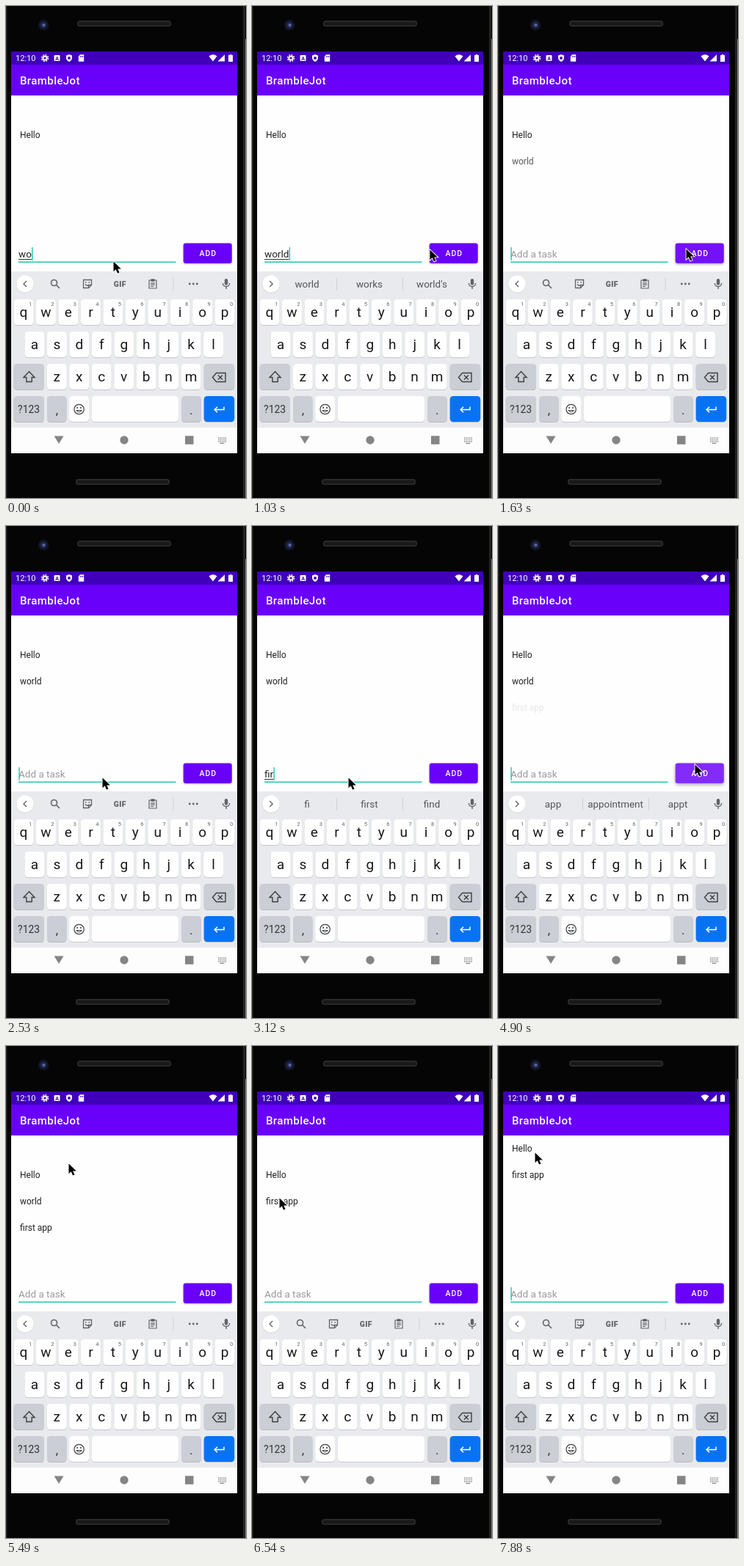
Write an HTML page with a canvas that moves like this. It is 327 px wide and 671 px high and loops after 8 s.

```html
<!DOCTYPE html>
<html lang="en">
<head>
<meta charset="utf-8">
<title>Task list</title>
<style>
html, body { margin: 0; width: 100%; height: 100%; overflow: hidden; background: #000; }
canvas { display: block; width: 327px; height: 671px; }
</style>
</head>
<body>
<canvas id="stage"></canvas>
<script>
const W = 327, H = 671, LOOP = 8000;
const canvas = document.getElementById('stage');
const dpr = window.devicePixelRatio || 1;
canvas.width = W * dpr;
canvas.height = H * dpr;
const c = canvas.getContext('2d');

const PURPLE = '#6800fa', GREY = '#5f6368', KEY = '#fefefe', DARK_KEY = '#cbced4';
const hello = ['Hello', 180, 1], world = ['world', 216, 1];
const app = (y, alpha = 1) => ['first app', y, alpha];

// Each step overrides part of the state and holds until the next one.
// typed: entry, word: start of the underlined word, words: suggestions (null = tool strip)
const steps = [
  [0, { typed: 'wo', word: 0, words: null, caret: 1, press: 0, mouse: [146, 348], rows: [hello] }],
  [140, { typed: 'wor' }],
  [290, { words: ['wo', 'would', 'work'] }],
  [440, { typed: 'worl', words: ['wor', 'work', 'world'] }],
  [590, { typed: 'world', words: ['world', 'works', "world's"] }],
  [740, { mouse: [165, 346] }],
  [880, { mouse: [212, 338] }],
  [1030, { mouse: [242, 332] }],
  [1180, { mouse: [256, 331], caret: 0 }],
  [1330, { press: 0.5 }],
  [1480, { typed: '', caret: 1, press: 1, rows: [hello, ['world', 216, 0.1]] }],
  [1630, { words: null, press: 0.4, rows: [hello, ['world', 216, 0.75]] }],
  [1780, { press: 0, mouse: [225, 337], rows: [hello, world] }],
  [1930, { mouse: [160, 342] }],
  [2080, { mouse: [131, 343], caret: 0 }],
  [2530, { caret: 1 }],
  [2830, { typed: 'f' }],
  [2980, { typed: 'fi', words: ['f', 'for', 'from'] }],
  [3120, { typed: 'fir', words: ['fi', 'first', 'find'] }],
  [3270, { typed: 'firs', words: ['fir', 'first', 'fire'] }],
  [3420, { typed: 'first', words: ['firs', 'first', 'firstly'] }],
  [3570, { typed: 'first ', word: 6, words: ['first', 'firsts', 'firstly'] }],
  [3710, { typed: 'first a', words: ['time', 'of', 'day'] }],
  [3860, { typed: 'first ap', words: ['a', 'and', 'aid'] }],
  [4010, { typed: 'first app', words: ['ap', 'app', 'apt'] }],
  [4300, { words: ['app', 'appointment', 'appt'], mouse: [150, 342] }],
  [4450, { mouse: [205, 335] }],
  [4600, { mouse: [256, 328], caret: 0 }],
  [4750, { mouse: [268, 325], press: 0.5 }],
  [4900, { typed: '', word: 0, caret: 1, press: 1, rows: [hello, world, app(252, 0.1)] }],
  [5040, { words: null, press: 0.4, rows: [hello, world, app(252, 0.75)] }],
  [5190, { press: 0, mouse: [205, 121], rows: [hello, world, app(252)] }],
  [5340, { mouse: [115, 141] }],
  [5490, { mouse: [85, 160], caret: 0 }],
  [5640, { mouse: [60, 180] }],
  [5790, { mouse: [45, 196] }],
  [5940, { mouse: [38, 205], caret: 1 }],
  [6090, { mouse: [37, 207] }],
  [6390, { caret: 0, rows: [hello, app(236)] }],
  [6540, { rows: [hello, app(216)] }],
  [6840, { mouse: [47, 165] }],
  [6990, { mouse: [50, 145], caret: 1 }],
  [7430, { caret: 0, rows: [['Hello', 164, 1], app(200)] }],
  [7580, { rows: [['Hello', 144, 1], app(180)] }],
  [7880, { caret: 1 }]
];

function rect(x, y, w, h, fill, r = 0) {
  c.fillStyle = fill;
  c.beginPath();
  c.roundRect(x, y, w, h, r);
  c.fill();
}

function disc(x, y, r, fill) {
  c.fillStyle = fill;
  c.beginPath();
  c.arc(x, y, r, 0, 7);
  c.fill();
}

function text(str, x, y, size, fill, { align = 'left', weight = 400, gap = 0 } = {}) {
  c.font = `${weight} ${size}px Roboto, sans-serif`;
  c.letterSpacing = gap + 'px';
  c.textAlign = align;
  c.fillStyle = fill;
  c.fillText(str, x, y);
}

// Path drawn around (x, y); a line width makes it an outline.
function icon(x, y, d, color, line = 0) {
  c.save();
  c.translate(x, y);
  const path = new Path2D(d);
  if (line) {
    c.strokeStyle = color;
    c.lineWidth = line;
    c.stroke(path);
  } else {
    c.fillStyle = color;
    c.fill(path, 'evenodd');
  }
  c.restore();
}

function key(x, y, w, fill = KEY) {
  rect(x, y + 1, w, 35, fill === KEY ? '#c5c8cc' : '#b6bac0', 4.5);
  rect(x, y, w, 35, fill, 4.5);
}

function phone() {
  rect(0, 0, W, H, '#050505');
  rect(0, 0, 1.5, H, '#242424');
  rect(323, 0, 3, H, '#242424');
  rect(326, 45, 1, H - 45, '#777');
  disc(51, 26, 7.5, '#11131f');
  disc(51, 26, 4.5, '#20264a');
  disc(51.5, 26, 2, '#5868b0');
  for (const [x, y] of [[97, 20], [95, 645]]) {
    rect(x, y, 128, 8, '#303030', 4);
    rect(x + 1.5, y + 1.5, 125, 5, '#191919', 2.5);
  }
}

function header() {
  rect(7, 62, 308, 548, '#fefefe');
  rect(7, 80, 308, 42, PURPLE);
  rect(7, 62, 308, 18, '#4000b9');
  text('12:10', 13, 75, 11, '#fff');
  c.setLineDash([1.9, 1.63]);
  icon(53, 71, 'M4.5 0A4.5 4.5 0 1 1 -4.5 0A4.5 4.5 0 1 1 4.5 0', '#fff', 1.5);
  c.setLineDash([]);
  icon(53, 71, 'M2.6 0A2.6 2.6 0 1 1 -2.6 0A2.6 2.6 0 1 1 2.6 0', '#fff', 2);
  rect(65.5, 67, 8, 8, '#fff', 1);
  text('A', 69.5, 73.7, 7, '#4000b9', { align: 'center', weight: 700 });
  icon(86, 71, 'M0 -5L4 -3.4V0Q3.5 3.7 0 5Q-3.5 3.7 -4 0V-3.4ZM-1.7 -1.7V1.7H1.7V-1.7Z', '#fff');
  icon(102.5, 71, 'M-1.4 -4.7H3.7V4.7H-3.7V-2.3ZM-1.3 -3V-1H-.4V-3ZM.4 -3V-1H1.2V-3ZM2 -3V-1H2.8V-3Z', '#fff');
  icon(282, 71, 'M-5.5 -2.6Q0 -6.8 5.5 -2.6L0 4.5Z', '#fff');
  icon(293, 71, 'M5 -4.7V4.5H-4.5Z', '#fff');
  icon(306, 71, 'M-1.2 -5H1.2V-4H3V5H-3V-4H-1.2Z', '#fff');
  text('BrambleJot', 19, 107, 15, '#fff', { weight: 500, gap: 0.4 });
}

function keyboard() {
  rect(7, 362, 308, 213, '#e8eaed');
  const letters = { align: 'center' };
  [['qwertyuiop', 24, 400], ['asdfghjkl', 39, 444], ['zxcvbnm', 69.3, 488]].forEach(([row, x0, y], r) => {
    [...row].forEach((ch, i) => {
      const x = x0 + i * 30.45;
      key(x - 13.4, y, 26.8);
      text(ch, x, y + 24.3, 19, '#17181a', letters);
      if (!r) text((i + 1) % 10, x + 9, 409, 7.5, GREY, letters);
    });
  });
  key(10.5, 488, 41.5, DARK_KEY);
  key(269.7, 488, 41.5, DARK_KEY);
  icon(31.5, 506, 'M0 -7.5L7.5 .5H3.7V6.5H-3.7V.5H-7.5Z', '#3c4043', 1.4);
  icon(290.5, 506.5, 'M-9 0L-4 -6H8.5V6H-4ZM-1.5 -3L4.5 3M4.5 -3L-1.5 3', '#3c4043', 1.4);
  key(10.5, 532, 41.5, DARK_KEY);
  key(56, 532, 26.5, DARK_KEY);
  key(86.2, 532, 26.8);
  key(116.8, 532, 118.2);
  key(239, 532, 26.8, DARK_KEY);
  key(269.7, 532, 41.5, '#0873f2');
  text('?123', 31, 555, 13.8, '#303236', letters);
  text(',', 69.3, 557, 17, '#303236', letters);
  text('.', 252.3, 557, 17, '#303236', letters);
  icon(99.6, 550, 'M6.7 0A6.7 6.7 0 1 1 -6.7 0A6.7 6.7 0 1 1 6.7 0M-3.5 1.5Q0 6 3.5 1.5Z', '#3c4043', 1.2);
  disc(97.2, 548, 1.1, '#3c4043');
  disc(102, 548, 1.1, '#3c4043');
  icon(290.5, 550.5, 'M6.5 -4V0H-6M-2.5 -3.8L-6.3 0L-2.5 3.8', '#fff', 1.5);
}

function navigation() {
  rect(7, 575, 308, 35, '#fdfdfd');
  icon(72, 591.5, 'M-6.5 -5H6.5L0 5.5Z', '#858585');
  disc(161, 592, 5.7, '#858585');
  rect(244, 586.3, 11.5, 11.5, '#858585');
  for (let y = 0; y < 3; y++)
    for (let x = 0; x < 5; x++) rect(289 + x * 2.4, 588.5 + y * 2.4, 1.4, 1.4, '#858585');
  rect(291.4, 595.8, 6, 1.2, '#858585');
}

function strip(words) {
  disc(26, 379.7, 11.7, '#d3d5d8');
  disc(26, 379, 11.5, '#fff');
  icon(26, 379, words ? 'M-2 -4L2 0L-2 4' : 'M2 -4L-2 0L2 4', GREY, 1.4);
  icon(300, 379, 'M-2.2 -4.7A2.2 2.2 0 0 1 2.2 -4.7V-.5A2.2 2.2 0 0 1 -2.2 -.5Z', GREY);
  icon(300, 379, 'M-4.6 -1A4.6 4.6 0 0 0 4.6 -1M0 3.6V7', GREY, 1.4);
  if (words) {
    words.forEach((w, i) => text(w, 75 + i * 85, 384, 13.4, '#505459', { align: 'center' }));
    rect(115, 371, 1, 17, '#cdd0d4');
    rect(205, 371, 1, 17, '#cdd0d4');
    return;
  }
  icon(67, 379, 'M2.5 -1.5A4 4 0 1 1 -5.5 -1.5A4 4 0 1 1 2.5 -1.5M1.3 1.3L6 6', GREY, 1.6);
  icon(111, 379, 'M-5.5 -5.5H5.5V1.5L1.5 5.5H-5.5ZM5.5 1.5H1.5V5.5M-3 .3Q-1 3.5 2 1', GREY, 1.3);
  disc(108.8, 376.8, 0.9, GREY);
  disc(113.2, 376.8, 0.9, GREY);
  text('GIF', 155.3, 382.8, 10.3, GREY, { align: 'center', weight: 900, gap: 0.4 });
  icon(200, 379, 'M-5 -5H5V6H-5ZM-2.8 -1.2H2.8M-2.8 1.2H2.8M-2.8 3.5H1', GREY, 1.2);
  rect(197.3, 372.3, 5.4, 3.4, GREY, 1);
  rect(227.5, 371, 1, 17, '#cdd0d4');
  for (const x of [250.3, 255.3, 260.3]) disc(x, 379, 1.4, GREY);
}

function entry({ typed, word, caret }) {
  rect(17, 348.5, 214.5, 1.5, '#20c8ae');
  text(typed || 'Add a task', 17, 343, 13.5, typed ? '#202020' : '#9b9b9b');
  const at = n => 17 + c.measureText(typed.slice(0, n)).width;
  const end = at(typed.length);
  if (typed) rect(at(word), 345, end - at(word), 1, '#303030');
  if (caret) rect(end + 0.3, 329, 1.4, 18, '#20c8ae');
}

function button(press) {
  c.save();
  c.shadowColor = 'rgba(0,0,0,.35)';
  c.shadowBlur = (2 + press * 3) * dpr;
  c.shadowOffsetY = (1 + press) * dpr;
  rect(241.7, 323.5, 66, 27.3, PURPLE, 3);
  c.restore();
  rect(241.7, 323.5, 66, 27.3, `rgba(255,255,255,${press * 0.17})`, 3);
  text('ADD', 275.2, 341, 10.5, '#fff', { align: 'center', weight: 500, gap: 0.9 });
}

function pointer([x, y]) {
  const d = 'M.5 .5V14.3L3.7 11.3L6 16.6L8.5 15.5L6.2 10.4H10.8Z';
  icon(x, y, d, '#fff', 1.8);
  icon(x, y, d, '#000');
}

function draw(now) {
  const t = now % LOOP;
  const state = Object.assign({}, ...steps.filter(s => s[0] <= t).map(s => s[1]));
  c.setTransform(dpr, 0, 0, dpr, 0, 0);
  phone();
  header();
  for (const [label, y, alpha] of state.rows) {
    c.globalAlpha = alpha;
    text(label, 19, y, 12, '#202020');
  }
  c.globalAlpha = 1;
  entry(state);
  button(state.press);
  keyboard();
  strip(state.words);
  navigation();
  pointer(state.mouse);
}

const start = performance.now();
(function loop() {
  draw(performance.now() - start);
  requestAnimationFrame(loop);
})();
</script>
</body>
</html>
```
